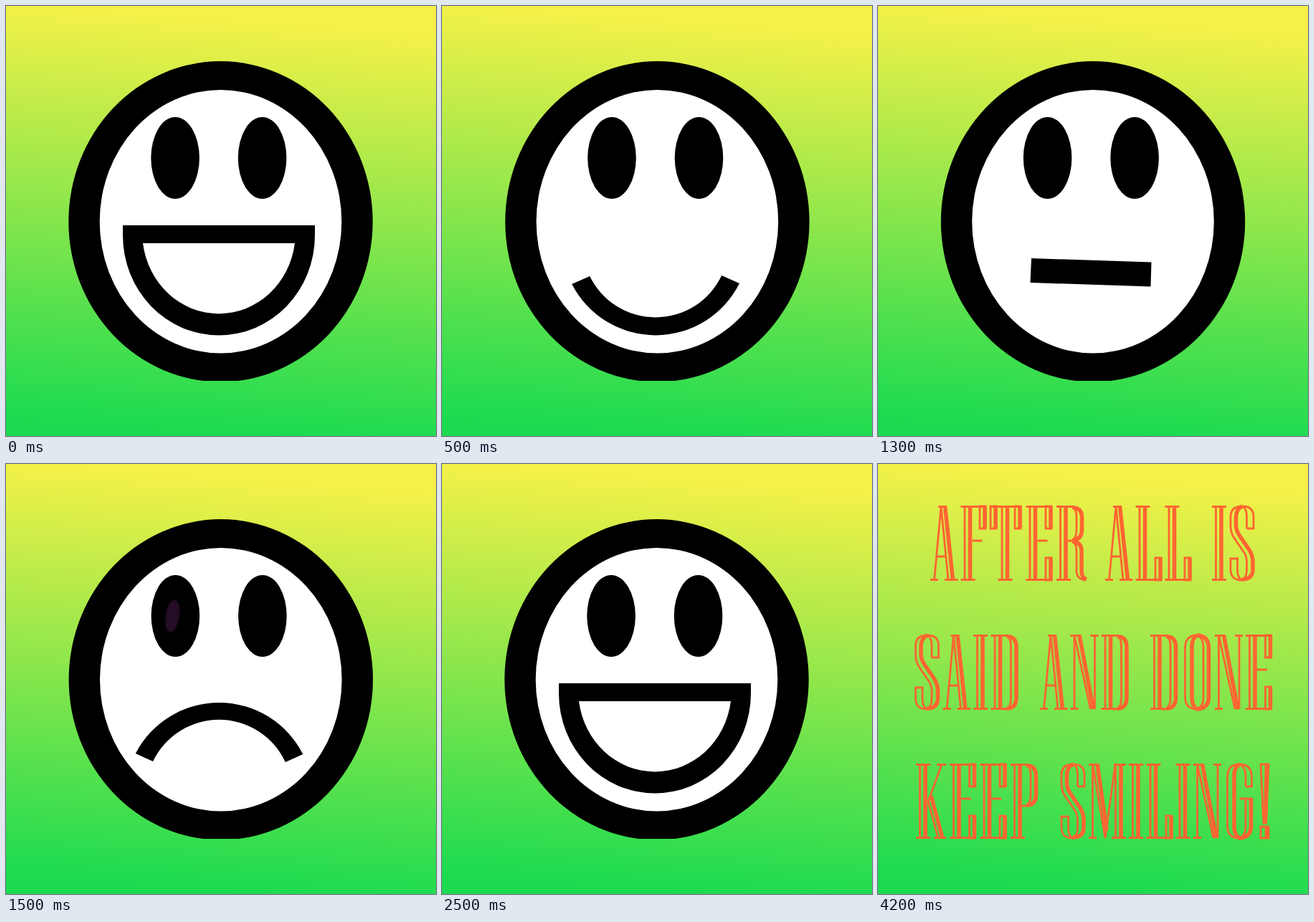
Animation of 600x600 px, one loop 5000 ms. Source, as an HTML page:

```html
<!DOCTYPE html>
<html lang="en">
<head>
<meta charset="utf-8">
<title>Keep smiling</title>
<style>
html, body { margin: 0; width: 100%; height: 100%; overflow: hidden; }
svg { display: block; width: 100%; height: 100%; }
#words { fill: none; stroke: #ff6531; }
</style>
</head>
<body>
<svg viewBox="0 0 600 600">
  <defs>
    <linearGradient id="bg" gradientUnits="userSpaceOnUse" x1="322" y1="18" x2="282" y2="592">
      <stop stop-color="#f5f148"/><stop offset="1" stop-color="#1cdb50"/>
    </linearGradient>
    <clipPath id="cut"><path d="M0 0H600V523H0Z"/></clipPath>
    <filter id="soft"><feGaussianBlur stdDeviation="1"/></filter>
  </defs>
  <path fill="url(#bg)" d="M0 0H600V600H0Z"/>
  <g id="face" clip-path="url(#cut)">
    <ellipse cx="300" cy="300.8" rx="212.2" ry="223.7"/>
    <ellipse cx="300" cy="300.8" rx="168.8" ry="183.8" fill="#fff"/>
    <ellipse id="left" cx="236.6" rx="33.8" ry="57"/>
    <ellipse id="right" rx="33.8" ry="57"/>
    <ellipse id="glint" cx="232.5" cy="212" rx="9.5" ry="23" fill="#260e27" transform="rotate(8 232.5 212)" filter="url(#soft)"/>
    <path id="mouth"/>
  </g>
  <g id="words" role="img"></g>
</svg>
<script>
const $ = id => document.getElementById(id);
const set = (el, attrs) => { for (const k in attrs) el.setAttribute(k, attrs[k]); };

const poses = [
  { dx: -.5, mouth: 'M163.5 306H431.5V320A134 139.5 0 0 1 163.5 320ZM191.5 331A107 114 0 0 0 403.5 331Z' },
  { dx: .4, mouth: 'M180.8 388A131 131 0 0 0 414.6 387L389.8 376A102 102 0 0 1 205.8 377Z' },
  { dx: 0, mouth: 'M214 352L381.5 357.5L380.5 391.5L212.5 386Z' },
  { dx: -.2, mouth: 'M181 404A131 131 0 0 1 414.5 405L390 416A102 102 0 0 0 205.3 415Z', glint: true },
  { dx: -.4, eyeY: 247, rightX: 375.4, wavy: true,
    mouth: 'M208.4 410C222 398 234 391 248 391C267 391 272 404 287 404C305 404 312 386 331 386C350 386 355 405 374 405C392 405 404 391 413.5 381' }
];

// Inline lettering: each letter is built from thin and heavy strokes.
const bar = (y, a, b) => `M${a} ${y}H${b}`;
const top_ = (a, b) => bar(2.5, a, b);
const foot = (a, b) => bar(104.5, a, b);
const stem = x => [`M${x + 1.5} 1V106`, `M${x + 9} 1V106`];
const beak = (x, y) => [`M${x + 1.5} ${y}h8v31h-8z`, `M${x + 8.5} ${y}v31`];
const bowl = h => [
  `M16 2.5H22Q28 6 28 17V${h - 15}Q28 ${h - 4} 22 ${h}H16`,
  `M22 3.5Q35.5 4 35.5 18V${h - 16}Q35.5 ${h - 1} 22 ${h - 1}`
];
const round = 'M21.5 2Q4.5 2 4.5 20V88Q4.5 105 21.5 105';
const inner = 'M21.5 2Q14 6 14 18V89Q14 101 21.5 105';
const join = (...parts) => parts.reduce(
  ([a, b], p) => typeof p === 'string' ? [a + p, b] : [a + p[0], b + p[1]], ['', '']);
const post = join(stem(4), top_(0, 20), foot(0, 20));

// letter: [advance, [thin path, heavy path]]
const letters = {
  ' ': [24.5, ['', '']],
  A: [42.5, join(['M5.5 105L15 2L25 105M8 72H21', 'M20.5 2L31.5 105'], top_(11, 23), foot(0, 11), foot(20, 38.5))],
  D: [44, join(post, bowl(105))],
  E: [42.5, join(post, top_(0, 37), foot(0, 37), beak(26, 2), beak(26, 74), bar(50, 16, 30))],
  F: [40, join(post, top_(0, 36), beak(25, 2), bar(50, 16, 30))],
  G: [46, join([round + 'Q30 101 30 89V50M21.5 50H40M30 33H40M30 33V18Q30 6 21.5 2Q38.5 2 38.5 20V33',
    inner + 'Q37.5 104 37.5 88V50'])],
  I: [24.5, post],
  K: [47, join(post, ['M36 2L17 54L31 105', 'M21 46L37 105'], top_(29, 42), foot(25, 42))],
  L: [41, join(post, foot(0, 37), beak(26, 74))],
  M: [56, join(stem(36), ['M5.5 105V2L23 105L37 2', 'M12 2L25 94'], top_(0, 15), top_(35, 52), foot(0, 11), foot(32, 52))],
  N: [43, join(['M5.5 105V2L28 105M34 2V105', 'M12.5 2L32 105'], top_(0, 15), top_(28, 39), foot(0, 11))],
  O: [46, join([round + 'Q30 101 30 89V18Q30 6 21.5 2', inner + 'Q37.5 104 37.5 88V20Q37.5 3 21.5 2'])],
  P: [45, join(post, bowl(60))],
  R: [43.5, join(post, bowl(50), ['M22 50Q28 54 28 64V92Q28 104 41 105', 'M22 51Q35 52 35 64V92Q35 102 42 104'])],
  S: [39.5, ['M24 33H33.5V17Q33.5 2 18 2Q1.5 2 1.5 17V30Q1.5 39 7 47L20 66Q24 72 24 80V90Q24 102 17 105Q1.5 105 1.5 90V75H11V90Q11 102 17 105M24 33V17Q24 5 18 2',
    'M18 2Q9 6 9 17V28Q9 36 14 43L27 62Q32.5 70 32.5 80V90Q32.5 104 17 104']],
  T: [51, join(stem(16), top_(0, 45), foot(12, 32), beak(0, 2), beak(34, 2))],
  '!': [20, ['M5 2H16L12.5 84H9ZM5 89H16V105H5Z', 'M13.5 2L11.5 82M13.5 89V105']]
};

const lines = [['AFTER ALL IS', 73], ['SAID AND DONE', 51], ['KEEP SMILING!', 53]];
set($('words'), { 'aria-label': lines.map(l => l[0]).join(' ') });
lines.forEach(([text, x], row) => {
  for (const ch of text) {
    const [advance, paths] = letters[ch];
    paths.forEach((d, heavy) => {
      const p = document.createElementNS($('words').namespaceURI, 'path');
      set(p, { d, transform: `translate(${x} ${57 + row * 180})`, 'stroke-width': heavy ? 5.5 : 2.8 });
      $('words').append(p);
    });
    x += advance;
  }
});

function show(pose) {
  $('face').style.display = pose ? '' : 'none';
  $('words').style.display = pose ? 'none' : '';
  if (!pose) return;
  const { dx, mouth, eyeY = 212, rightX = 358.1, glint, wavy } = pose;
  set($('face'), { transform: `translate(${dx} 0)` });
  set($('left'), { cy: eyeY });
  set($('right'), { cx: rightX, cy: eyeY });
  $('glint').style.display = glint ? '' : 'none';
  set($('mouth'), {
    d: mouth, 'fill-rule': 'evenodd', 'stroke-width': 20,
    fill: wavy ? 'none' : '#000', stroke: wavy ? '#000' : 'none'
  });
}

const start = performance.now();
function frame() {
  const step = Math.floor((performance.now() - start) % 5000 / 500);
  show(step < 6 ? poses[step % 5] : null);
  requestAnimationFrame(frame);
}
frame();
</script>
</body>
</html>
```
